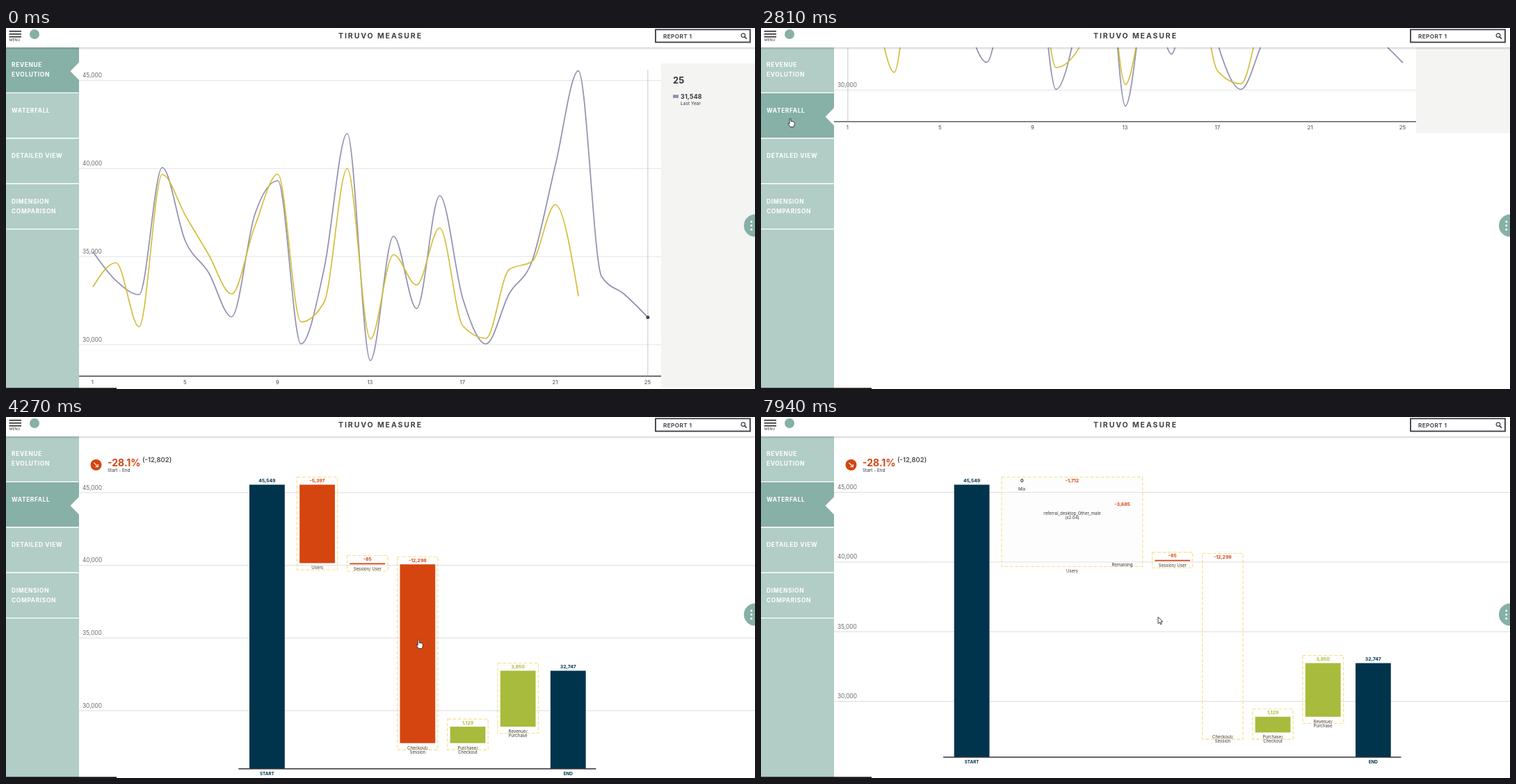
Write an HTML page with a canvas that moves like this. It is 1077 px wide and 520 px high and loops after 8000 ms.

```html
<!DOCTYPE html>
<html lang="en">
<head>
<meta charset="utf-8">
<title>Revenue report</title>
<style>
html, body { margin: 0; width: 100%; height: 100%; overflow: hidden; background: #fff; }
canvas { display: block; width: 1077px; height: 520px; }
</style>
</head>
<body>
<canvas id="stage"></canvas>
<script>
const W = 1077, H = 520, LOOP = 8000;
const canvas = document.getElementById('stage');
const ctx = canvas.getContext('2d');
const ratio = window.devicePixelRatio || 1;
canvas.width = W * ratio;
canvas.height = H * ratio;

const C = {
  teal: '#87b0a7', pale: '#b1cdc5', ink: '#36363c', grey: '#67676c', grid: '#e2e2e2',
  last: '#918fb0', now: '#d3be3c', navy: '#00344c', red: '#d54510', green: '#a8bb3c',
  dash: '#f7de88', panel: '#f4f4f2'
};

const lastYear = [35272, 33627, 32838, 40052, 35874, 34100, 31577, 37372, 39303, 30039, 34297, 41984, 29093,
  36150, 32050, 38456, 32602, 30039, 32878, 34770, 40170, 45549, 33863, 32838, 31548];
const thisYear = [33275, 34652, 31005, 39658, 37332, 35125, 32878, 36701, 39678, 31281, 32405, 39993, 30315,
  35105, 33390, 36623, 31064, 30355, 34257, 34730, 37943, 32747];

const steps = [
  { name: 'Users', delta: -5397, kids: [['Mix', 0], ['referral_desktop_Other_male|(x2.04)', -1712], ['Remaining', -3685]] },
  { name: 'Session/ User', delta: -85 },
  { name: 'Checkout/|Session', delta: -12298, kids: [['Mix', -3445], ['organic (x2.43)', -5367], ['Remaining', -3486]] },
  { name: 'Purchase/|Checkout', delta: 1129 },
  { name: 'Revenue/|Purchase', delta: 3850 }
];

// time, x, y of the pointer tip
const pointer = [
  [150, 935, 330], [930, 78, 290], [1250, 38, 92], [1400, 35, 134], [1550, 35, 134], [1630, 34, 136],
  [1860, 36, 131], [2100, 41, 121], [2340, 41, 121], [2810, 42, 130], [3080, 47, 140], [3350, 305.5, 220],
  [4230, 593, 321], [4670, 601, 314], [4970, 601, 314], [5050, 601, 315], [5200, 603, 322],
  [6520, 603, 322], [7240, 372, 100], [7340, 372, 100], [7940, 571, 288]
];

const T = { select: 2270, scroll: 2380, scrollEnd: 3030, waterfall: 3130, settle: 3650, bars: 3950, expand: 5200, swap: 7700 };

const clamp = v => Math.max(0, Math.min(1, v));
const span = (t, a, b) => clamp((t - a) / (b - a));
const smooth = p => p * p * (3 - 2 * p);
const mix = (a, b, p) => a + (b - a) * p;
const commas = n => n.toLocaleString('en-US');

function text(str, x, y, size, { color = C.ink, weight = 400, align = 'left', gap = 0 } = {}) {
  ctx.font = `${weight} ${size}px Inter, sans-serif`;
  ctx.letterSpacing = gap + 'px';
  ctx.textAlign = align;
  ctx.fillStyle = color;
  ctx.fillText(str, x, y + size * 0.36);
}

function rect(x, y, w, h, color) {
  ctx.fillStyle = color;
  ctx.fillRect(x, y, w, h);
}

function line(x1, y1, x2, y2, color, width = 1) {
  ctx.beginPath();
  ctx.moveTo(x1, y1);
  ctx.lineTo(x2, y2);
  ctx.strokeStyle = color;
  ctx.lineWidth = width;
  ctx.stroke();
}

function disc(x, y, r, color) {
  ctx.beginPath();
  ctx.arc(x, y, r, 0, Math.PI * 2);
  ctx.fillStyle = color;
  ctx.fill();
}

function polygon(points, fill, stroke) {
  ctx.beginPath();
  points.forEach(([x, y]) => ctx.lineTo(x, y));
  ctx.closePath();
  ctx.fillStyle = fill;
  ctx.fill();
  if (stroke) {
    ctx.strokeStyle = stroke;
    ctx.lineWidth = 0.9;
    ctx.stroke();
  }
}

/* Line chart */

const STEP = 33.25;
const dayX = i => 124.9 + i * STEP;
const valueY = v => 456 - (v - 30000) * 0.025367;

// Monotone cubic: flat at each local extreme.
function curve(values, color) {
  const y = values.map(valueY), n = y.length;
  const slope = y.slice(1).map((v, i) => (v - y[i]) / STEP);
  const tangent = y.map((_, i) => {
    if (i === 0 || i === n - 1) return null;
    const a = slope[i - 1], b = slope[i];
    return (Math.sign(a) + Math.sign(b)) * Math.min(Math.abs(a), Math.abs(b), Math.abs(a + b) / 4);
  });
  tangent[0] = (3 * slope[0] - tangent[1]) / 2;
  tangent[n - 1] = (3 * slope[n - 2] - tangent[n - 2]) / 2;
  const h = STEP / 3;
  ctx.beginPath();
  ctx.moveTo(dayX(0), y[0]);
  for (let i = 1; i < n; i++) {
    ctx.bezierCurveTo(dayX(i - 1) + h, y[i - 1] + h * tangent[i - 1],
      dayX(i) - h, y[i] - h * tangent[i], dayX(i), y[i]);
  }
  ctx.strokeStyle = color;
  ctx.lineWidth = 1.7;
  ctx.lineJoin = 'round';
  ctx.stroke();
}

function legendRow(y, color, value, label) {
  rect(959, y - 2.3, 8, 4.6, color);
  text(commas(value), 970, y, 8.8, { weight: 700, gap: 0.2 });
  text(label, 970, y + 10, 6.4, { gap: 0.1 });
}

function lineChart(day) {
  for (let v = 45000; v >= 30000; v -= 5000) {
    const y = valueY(v);
    line(105, y, 942, y, C.grid);
    text(commas(v), 110, y - 7.4, 8.3, { color: C.grey });
  }
  line(105, 501.5, 942, 501.5, '#3c3c40', 1.4);
  for (let i = 0; i < 25; i += 4) text(i + 1, dayX(i) - 0.5, 510, 7.8, { align: 'center', color: '#4c4c50' });

  line(dayX(day), 60, dayX(day), 501, '#c8c8c8');
  curve(lastYear, C.last);
  curve(thisYear, C.now);

  rect(942, 51, 135, 467, C.panel);
  text(day + 1, 959, 75, 13, { weight: 700 });
  legendRow(98.5, C.last, lastYear[day], 'Last Year');
  disc(dayX(day), valueY(lastYear[day]), 2.5, '#48484c');
  if (day < thisYear.length) {
    legendRow(129, C.now, thisYear[day], 'This Year');
    disc(dayX(day), valueY(thisYear[day]), 2.5, '#48484c');
  }
}

/* Waterfall */

const SLOT = 72.15;

function layout(open) {
  const scale = open < 0 ? 0.020935 : 0.020075;
  const first = open < 0 ? 375.4 : 303.1;
  const base = open < 0 ? 506.7 : 490;
  const y = v => 97.5 + (45549 - v) * scale;
  const bars = [], boxes = [];
  let level = 45549, slot = 1;
  const add = (name, delta, parent) => {
    const x = first + SLOT * slot++;
    const from = y(level), to = y(level += delta);
    bars.push({ x, from, to, name, parent, label: commas(delta), color: delta > 0 ? C.green : delta < 0 ? C.red : C.ink });
    return x;
  };
  steps.forEach((step, i) => {
    const start = level;
    let left, right;
    if (i === open) {
      const xs = step.kids.map(([name, delta]) => add(name, delta, i));
      left = xs[0];
      right = xs[xs.length - 1];
    } else {
      left = right = add(step.name, step.delta, i);
    }
    const a = y(start), b = y(level);
    boxes.push({
      x: left - 29.2, w: right - left + 58.4, y: Math.min(a, b) - 11, h: Math.abs(a - b) + 20.7,
      open: i === open, title: step.name.replace('|', ' ')
    });
  });
  const end = first + SLOT * slot;
  const total = (x, v, name) => ({ x, from: base, to: y(v), name, label: commas(v), color: C.navy, total: true });
  bars.push(total(first, 45549, 'START'), total(end, 32747, 'END'));
  return { bars, boxes, y, base, first, end };
}

const layouts = { all: layout(-1), checkout: layout(2), users: layout(0) };

function currentLayout(t) {
  return t < T.expand ? layouts.all : t < T.swap ? layouts.checkout : layouts.users;
}

function barGrowth(bar, t) {
  if (t < T.expand) return smooth(span(t, T.bars, T.bars + 270));
  if (t < T.swap) return bar.parent === 2 ? smooth(span(t, T.expand + 30, T.expand + 240)) : 1;
  return bar.parent === 0 || bar.parent === 2 ? 0 : 1;
}

function drawBar(bar, t) {
  const { x, from, to, color } = bar;
  const top = Math.min(from, to), bottom = Math.max(from, to);
  const now = mix(from, to, barGrowth(bar, t));
  rect(x - 25.4, Math.min(from, now), 50.8, Math.abs(now - from), color);
  text(bar.label, x, top - 6, 6.8, { color, weight: 700, align: 'center' });
  bar.name.split('|').forEach((part, i) => {
    const style = bar.total ? { color: C.navy, weight: 700, align: 'center' } : { align: 'center' };
    text(part, x, bottom + 6.6 + i * 6.1, bar.total ? 6.3 : 6.1, style);
  });
}

function summary(settled) {
  const y = settled ? 69 : 66;
  disc(129.5, y, 8, C.red);
  line(126.5, y - 3, 132, y + 2.5, '#fff', 1.1);
  line(132.3, y - 1, 132.3, y + 3, '#fff', 1.1);
  line(128.5, y + 2.7, 132.8, y + 2.7, '#fff', 1.1);
  if (settled) text('-28.1%', 146, 65.5, 14, { color: C.red, weight: 700 });
  text('(-12,802)', settled ? 196 : 151, 62, 9.6, { weight: 500 });
  text('Start - End', 146, settled ? 77 : 71.5, 6.4);
}

function waterfall(t) {
  const settled = t >= T.settle;
  const plan = currentLayout(t);
  summary(settled);
  ctx.save();
  if (!settled) ctx.translate(0, -5.7);

  ctx.globalAlpha = span(t, T.settle, T.bars);
  for (let v = 45000; v >= 30000; v -= 5000) {
    const y = plan.y(v);
    line(105, y, W, y, '#dcdcdc');
    text(commas(v), 110, y - 7.4, 8.3, { color: C.grey });
  }
  ctx.globalAlpha = span(t, T.settle + 150, T.bars + 100);
  for (const box of plan.boxes) {
    if (box.open) {
      const shade = t < T.swap ? span(t, T.expand, T.expand + 240) : 0.2;
      rect(box.x, box.y, box.w, box.h, `rgba(244,244,244,${shade})`);
      text(box.title, box.x + box.w / 2, box.y + box.h + 6.5, 6.1, { align: 'center' });
    }
    ctx.setLineDash([5, 2.5]);
    ctx.strokeStyle = C.dash;
    ctx.lineWidth = 1.1;
    ctx.strokeRect(box.x, box.y, box.w, box.h);
    ctx.setLineDash([]);
  }
  ctx.globalAlpha = 1;
  plan.bars.forEach(bar => drawBar(bar, t));
  line(plan.first - 41, plan.base, plan.end + 40, plan.base, '#333338', 1.4);
  ctx.restore();
  if (t >= T.expand && t < 6520) rect(105, 513, 658.5, 5, '#f2f2f2');
}

/* Frame around the charts */

function sidebar(active) {
  rect(0, 28, 105, 492, C.pale);
  const top = 28 + active * 65.4;
  rect(0, top, 105, 65.4, C.teal);
  polygon([[105, top + 21.5], [92.5, top + 34.3], [105, top + 47]], '#fff');
  const rows = ['REVENUE|EVOLUTION', 'WATERFALL', 'DETAILED VIEW', 'DIMENSION|COMPARISON'];
  rows.forEach((row, i) => {
    const y = 28 + i * 65.4;
    row.split('|').forEach((part, k) => text(part, 8, y + 25.3 + k * 14, 8.4, { color: '#fff', weight: 700, gap: 0.65 }));
    line(0, y + 65.4, 105, y + 65.4, '#fff', 1.4);
  });
}

function header() {
  ctx.save();
  ctx.shadowColor = 'rgba(0,0,0,.25)';
  ctx.shadowBlur = 3 * ratio;
  ctx.shadowOffsetY = ratio;
  rect(-5, -5, W + 10, 33, '#fff');
  ctx.restore();
  for (const y of [4.7, 8.7, 12.7]) line(4.5, y, 22, y, '#303034', 1.7);
  text('MENU', 12.6, 17.4, 5.2, { align: 'center' });
  disc(41, 9, 7, C.teal);
  text('TIRUVO MEASURE', 538.5, 11.3, 10.5, { weight: 700, align: 'center', gap: 1.9, color: '#404044' });
  ctx.strokeStyle = '#3a3a40';
  ctx.lineWidth = 1.8;
  ctx.strokeRect(934, 2.3, 136, 18.2);
  text('REPORT 1', 945, 12, 8.2, { weight: 600, gap: 0.4 });
  ctx.beginPath();
  ctx.arc(1060, 10.6, 2.8, 0, Math.PI * 2);
  ctx.lineWidth = 1.2;
  ctx.stroke();
  line(1062, 12.7, 1065, 15.6, '#3a3a40', 1.6);
}

function moreButton() {
  disc(1077, 284.6, 16, C.teal);
  for (const y of [279, 284.6, 290.2]) disc(1071.8, y, 1.5, '#fff');
}

/* Pointer */

function pointerAt(t) {
  const k = pointer.findIndex(p => p[0] > t);
  if (k < 1) return t < pointer[0][0] ? null : pointer[pointer.length - 1].slice(1);
  const [t0, x0, y0] = pointer[k - 1], [t1, x1, y1] = pointer[k];
  const p = smooth(span(t, t0, t1));
  return [mix(x0, x1, p), mix(y0, y1, p)];
}

function overLink([x, y], t) {
  if (x < 105) return true;
  return t >= T.settle && currentLayout(t).boxes.some(b => x > b.x && x < b.x + b.w && y > b.y && y < b.y + b.h);
}

const ARROW = [[0, 0], [0, 9.5], [2.2, 7.6], [3.7, 10.8], [5.2, 10.1], [3.8, 7], [6.6, 6.8]];
const HAND = [[-1, 0.8], [0, 0], [1, 0.8], [1, 4.4], [3, 4.6], [5, 5.2], [6.2, 6.2], [6.2, 9], [5, 12.6], [0, 12.6], [-3, 8.4], [-2.6, 7.2], [-1, 8.2]];

function drawPointer(pos, t) {
  const shape = overLink(pos, t) ? HAND : ARROW;
  polygon(shape.map(([x, y]) => [pos[0] + x, pos[1] + y]), '#fff', '#2a2a2e');
}

function draw(t) {
  ctx.setTransform(ratio, 0, 0, ratio, 0, 0);
  rect(0, 0, W, H, '#fff');
  const pos = pointerAt(t);
  if (t < T.scrollEnd) {
    const p = span(t, T.scroll, T.scrollEnd);
    const day = t < 930 && pos ? Math.round((pos[0] - dayX(0)) / STEP) : t < 930 ? 24 : 0;
    ctx.save();
    ctx.translate(0, -492 * (0.5 - Math.cos(Math.PI * p) / 2));
    lineChart(Math.max(0, Math.min(24, day)));
    ctx.restore();
  } else if (t >= T.waterfall) {
    waterfall(t);
  }
  sidebar(t < T.select ? 0 : 1);
  header();
  moreButton();
  rect(0, 518.4, 159, 1.6, '#111');
  if (pos) drawPointer(pos, t);
}

const began = performance.now();
function tick() {
  draw((performance.now() - began) % LOOP);
  requestAnimationFrame(tick);
}
tick();
</script>
</body>
</html>
```
